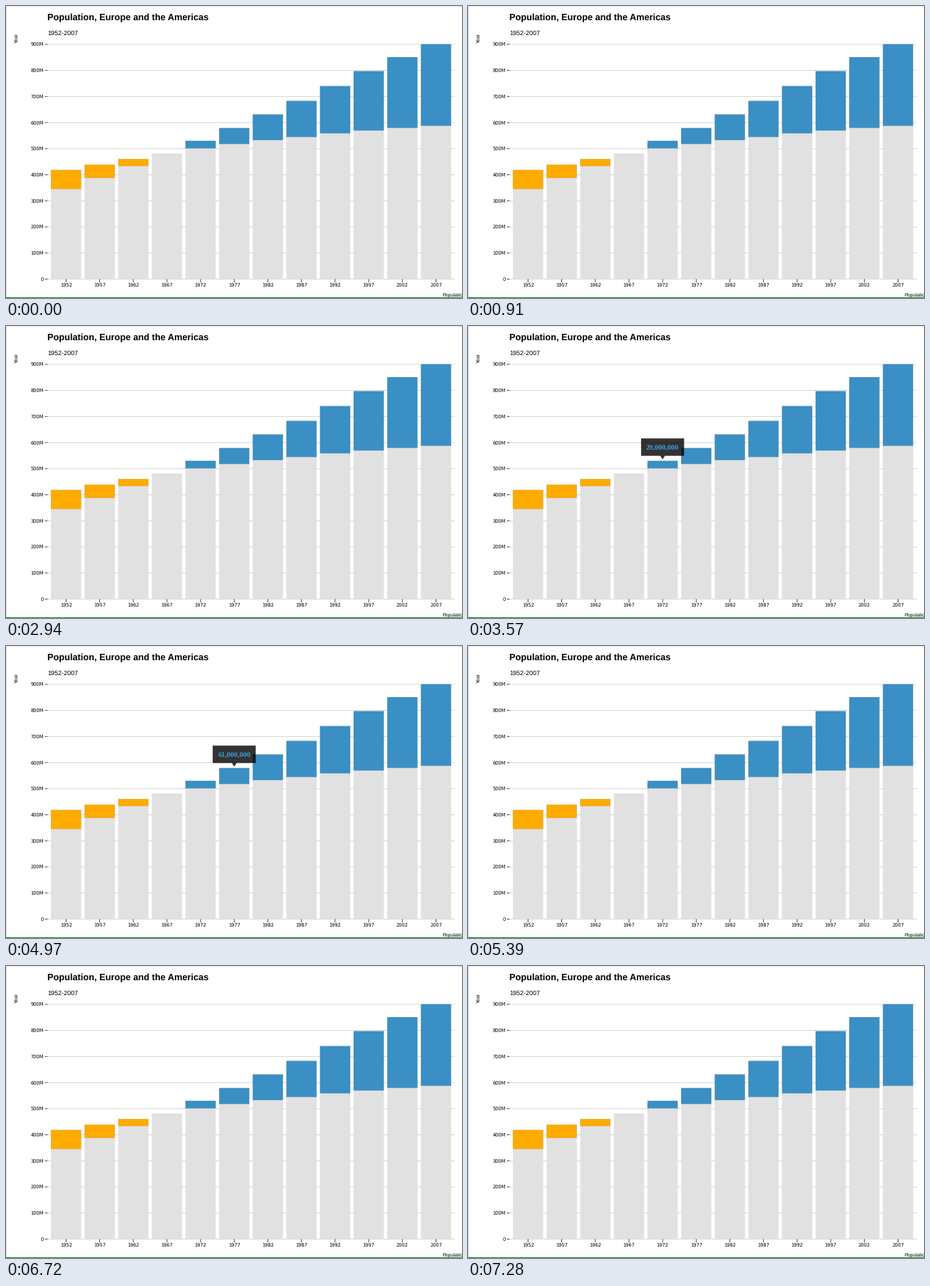
A matplotlib script that plays this animation: 640x411 px, repeating every 7350 ms.

```python
import matplotlib.pyplot as plt
from matplotlib.animation import FuncAnimation
from matplotlib.patches import Polygon, Rectangle

W, H, DPI = 640, 411, 64
FRAMES, STEP_MS = 105, 70
PT = 72 / DPI

GRAY, ORANGE, BLUE = "#e1e1e1", "#ffab00", "#3a8fc4"
TIP_BLUE = "#3c9bd8"

BASE_Y, TOP_Y = 384.4, 53.9
BAR_X, BAR_W, BAR_STEP = 63.1, 42.4, 47.2

# Pixel heights of the smaller and the larger total per year
LOW = [257.6, 242, 225.2, 207.5, 200.3, 194.2, 188.8, 184.4, 179.2, 175.2, 171.6, 168.7]
HIGH = [230.8, 223.4, 215.4, 207.5, 189.8, 171.8, 152.6, 133.6, 112.7, 91.7, 72, 53.8]

# First frame, last frame, bar index, label
HOVERS = [
    (20, 38, 0, "73,000,000"),
    (45, 62, 4, "29,000,000"),
    (63, 76, 5, "61,000,000"),
    (80, 93, 0, "73,000,000"),
]

plt.rcParams["text.hinting"] = "none"
plt.rcParams["path.snap"] = False

fig = plt.figure(figsize=(W / DPI, H / DPI), dpi=DPI, facecolor="white")
ax = fig.add_axes([0, 0, 1, 1])
ax.set_xlim(0, W)
ax.set_ylim(H, 0)
ax.axis("off")


def label(x, y, s, px, font="Liberation Sans", **kw):
    kw.setdefault("va", "baseline")
    kw.setdefault("color", "black")
    return ax.text(x, y, s, fontsize=px * PT, family=font, **kw)


def line(x0, y0, x1, y1, color, px=1, z=1):
    ax.plot([x0, x1], [y0, y1], color=color, lw=px * PT, zorder=z,
            solid_capstyle="butt")


def rect(x, y, w, h, color, z=2, edge="none", px=0):
    ax.add_patch(Rectangle((x, y), w, h, fc=color, ec=edge, lw=px * PT, zorder=z))


def center(i):
    return BAR_X + BAR_W / 2 + i * BAR_STEP


def draw_axes():
    for k in range(10):
        y = BASE_Y - k * (BASE_Y - TOP_Y) / 9
        line(59, y, 630, y, "#d4d4d4")
        line(54.5, y, 58.5, y, "#444444", z=3)
        label(53, y + 2.4, f"{k}00M" if k else "0", 6.6, "DejaVu Sans", ha="right")
    for i in range(12):
        x = center(i)
        line(x, BASE_Y, x, 389, "#444444", z=3)
        label(x, 395, str(1952 + 5 * i), 6.6, "DejaVu Sans", ha="center")


def draw_bars():
    for i, (low, high) in enumerate(zip(LOW, HIGH)):
        x = BAR_X + i * BAR_STEP
        rect(x, low, BAR_W, BASE_Y - low, GRAY)
        if high < low:
            rect(x, high, BAR_W, low - high, ORANGE if i < 3 else BLUE,
                 edge="#88888866", px=0.5)


def draw_titles():
    label(58, 20, "Population, Europe and the Americas", 12.7, weight="bold")
    label(58.3, 41, "1952-2007", 9)
    label(15, 45.3, "Year", 7, rotation=90, ha="center", va="center")
    label(612.5, 408.7, "Population", 7)


def draw_borders():
    line(0.5, 0, 0.5, 410, "#d8d8d8")
    line(0, 0.5, W, 0.5, "#e4e4e4")
    rect(0, 410, W, 2, "#128a12", z=4)


draw_axes()
draw_bars()
draw_titles()
draw_borders()

tip_shape = ax.add_patch(Polygon([(0, 0), (1, 0), (1, 1)], closed=True,
                                 fc="black", alpha=0.8, lw=0, zorder=6))
tip_text = label(0, 0, "", 10.3, "Liberation Serif", weight="bold",
                 ha="center", zorder=7)


def update(frame):
    hover = next((h for h in HOVERS if h[0] <= frame <= h[1]), None)
    tip_shape.set_visible(hover is not None)
    tip_text.set_visible(hover is not None)
    if hover:
        _, _, i, text = hover
        x, y = center(i), HIGH[i]
        left, right = x - 30.2, x + 30.2
        top, bottom = y - 31.6, y - 7.1
        tip_shape.set_xy([(left, top), (right, top), (right, bottom),
                          (x + 3.2, bottom), (x, y - 2), (x - 3.2, bottom),
                          (left, bottom)])
        tip_text.set_text(text)
        tip_text.set_position((x, y - 15.5))
        tip_text.set_color(ORANGE if i < 3 else TIP_BLUE)
    return tip_shape, tip_text


anim = FuncAnimation(fig, update, frames=FRAMES, interval=STEP_MS,
                     repeat=True, repeat_delay=0, blit=False)
plt.show()
```
